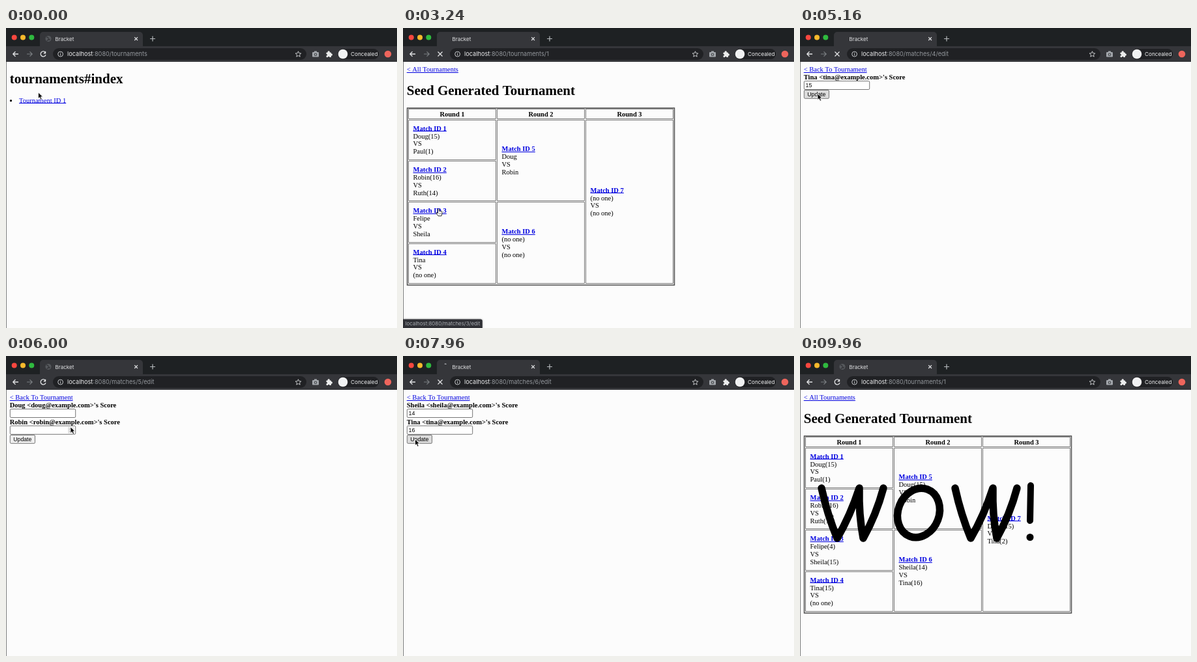
Write an HTML page with a canvas that moves like this. It is 600x461 px and loops after 10 s.

```html
<!DOCTYPE html>
<html lang="en">
<head>
<meta charset="utf-8">
<title>Bracket</title>
<style>
html, body { margin: 0; width: 100%; height: 100%; overflow: hidden; background: #fcfcfc; }
canvas { display: block; width: 600px; height: 461px; }
</style>
</head>
<body>
<canvas id="stage" width="600" height="461"></canvas>
<script>
const ctx = document.getElementById('stage').getContext('2d');
const LOOP = 10000, STEP = 40, TAU = Math.PI * 2;
const SERIF = '"Liberation Serif", serif';
const UI = 'Inter, sans-serif';
const FORM = '"Liberation Sans", sans-serif';
const LINK = '#0000e0';

// A numeric player is the winner of that match.
const matches = [
  { players: ['Doug', 'Paul'], scores: [15, 1], winner: 0, x: 15.5, y: 157.5 },
  { players: ['Robin', 'Ruth'], scores: [16, 14], winner: 0, x: 15.5, y: 221 },
  { players: ['Felipe', 'Sheila'], scores: [4, 15], winner: 1, x: 15.5, y: 284.3 },
  { players: ['Tina', null], scores: [15, null], winner: 0, x: 15.5, y: 347.5 },
  { players: [1, 2], scores: [15, null], winner: 0, x: 151.5, y: 189 },
  { players: [3, 4], scores: [14, 16], winner: 1, x: 151.5, y: 316 },
  { players: [5, 6], scores: [15, 2], winner: 0, x: 287.5, y: 252.5 }
];

// One visit to a match form: link click, page open, typing, submit, back to the table.
const runs = [
  { id: 1, click: 600, open: 680, keys: [840, 1020], submit: 1240, close: 1400, press: [32.5, 127.5] },
  { id: 2, click: 1760, open: 1840, keys: [2060, 2340], submit: 2560, close: 2700, press: [30, 128] },
  { id: 3, click: 3230, open: 3320, keys: [3520, 4160], retry: 3860, submit: 4360, close: 4520, press: [37, 139] },
  { id: 4, click: 4760, open: 4860, keys: [5020], submit: 5160, close: 5290, press: [27, 101] },
  { id: 5, click: 5620, open: 5740, keys: [6160], submit: 6400, close: 6520, press: [26, 128] },
  { id: 6, click: 6860, open: 6980, keys: [7260, 7600], submit: 7920, close: 8060, press: [18.5, 128] },
  { id: 7, click: 8400, open: 8500, keys: [8680, 8860], submit: 9040, close: 9160, press: [28, 128] }
];
const TABLE_OPEN = 400, INDEX_CLICK = 260, WOW_AT = 9440;

const within = (t, a, b) => t >= a && t < b;
const path = buildCursorPath();

function buildCursorPath() {
  const points = [[0, 49.5, 99], [180, 54, 111], [320, 54, 111], [6000, 99, 109], [9440, 46, 240]];
  for (const r of runs) {
    const m = matches[r.id - 1];
    const lx = m.x + 39, ly = m.y - 3;
    points.push([r.click - 60, lx, ly], [r.click + 50, lx, ly]);
    r.keys.forEach((k, i) => points.push([k - 90, 70 - i * 10, 88 + i * 26 + (r.retry && i ? 12 : 0)]));
    if (r.retry) points.push([r.retry - 100, 33, 127], [r.retry + 60, 33, 127]);
    points.push([r.submit - 40, ...r.press], [r.close + 100, ...r.press]);
  }
  return points.sort((a, b) => a[0] - b[0]);
}

function cursorAt(t) {
  const i = path.findIndex(p => p[0] > t);
  if (i < 0) return path[path.length - 1].slice(1);
  const [t0, x0, y0] = path[i - 1], [t1, x1, y1] = path[i];
  const u = (t - t0) / (t1 - t0), e = u * u * (3 - 2 * u);
  return [x0 + (x1 - x0) * e, y0 + (y1 - y0) * e];
}

function rect(x, y, w, h, color) {
  ctx.fillStyle = color;
  ctx.fillRect(x, y, w, h);
}

function pill(x, y, w, h, radii, fill, stroke, width = 1) {
  ctx.beginPath();
  ctx.roundRect(x, y, w, h, radii);
  if (fill) { ctx.fillStyle = fill; ctx.fill(); }
  if (stroke) { ctx.strokeStyle = stroke; ctx.lineWidth = width; ctx.stroke(); }
}

function disc(x, y, r, color) {
  ctx.beginPath();
  ctx.arc(x, y, r, 0, TAU);
  ctx.fillStyle = color;
  ctx.fill();
}

function line(d, color, width, fill) {
  const p = new Path2D(d);
  if (fill) { ctx.fillStyle = fill; ctx.fill(p); }
  ctx.strokeStyle = color;
  ctx.lineWidth = width;
  ctx.stroke(p);
}

function text(s, x, y, font, color = '#000', align = 'left') {
  ctx.font = font;
  ctx.fillStyle = color;
  ctx.textAlign = align;
  ctx.fillText(s, x, y);
  return ctx.measureText(s).width;
}

const body = (s, x, y, bold, align) =>
  text(s, x, y, `${bold ? 'bold ' : ''}10.5px ${SERIF}`, '#000', align);
const heading = (s, y) => text(s, 5.7, y, `bold 21px ${SERIF}`);

function link(s, x, y, bold) {
  const w = text(s, x, y, `${bold ? 'bold ' : ''}10.5px ${SERIF}`, LINK);
  rect(x, Math.round(y + 0.6), w, 1, LINK);
}

function playerName(slot, done) {
  if (typeof slot !== 'number') return slot;
  const m = matches[slot - 1];
  return done >= slot ? playerName(m.players[m.winner], done) : null;
}

function drawIndex() {
  heading('tournaments#index', 85);
  disc(7.5, 111.7, 1.6, '#000');
  link('Tournament ID 1', 20, 114.5);
}

function drawTable(done) {
  link('< All Tournaments', 5.7, 67);
  heading('Seed Generated Tournament', 103);
  const box = (x, y, w, h) => pill(x + 0.5, y + 0.5, w - 1, h - 1, 0, null, '#777');
  pill(6.5, 123, 410, 272, 0, null, '#4c4c4c', 1.5);
  for (let c = 0; c < 3; c++) {
    const x = 8 + c * 136, count = 4 >> c, span = 253 / count;
    const rowTop = r => Math.round(140.9 + r * span);
    box(x, 124, 135, 16);
    body('Round ' + (c + 1), x + 67.5, 135.5, true, 'center');
    for (let r = 0; r < count; r++) box(x, rowTop(r), 135, rowTop(r + 1) - rowTop(r) - 1);
  }
  matches.forEach((m, i) => {
    const label = side => {
      const name = playerName(m.players[side], done);
      const score = m.scores[side];
      return name ? name + (done > i && score !== null ? `(${score})` : '') : '(no one)';
    };
    link('Match ID ' + (i + 1), m.x, m.y, true);
    [label(0), 'VS', label(1)].forEach((s, k) => body(s, m.x, m.y + 12 + k * 11.9));
  });
}

function drawField(y, value, focused, spinner) {
  pill(6.3, y + 0.5, 100.4, 13, 1.5, '#fff', focused ? '#101010' : '#767676', focused ? 1.6 : 1);
  const w = text(value, 8.5, y + 10.2, `8.8px ${FORM}`);
  if (focused) rect(9 + w, y + 2.5, 0.8, 9, '#000');
  if (spinner) {
    rect(95, y + 2, 9.5, 10, '#e4e4e4');
    line(`M97.5 ${y + 6}l2 -2l2 2M97.5 ${y + 8.5}l2 2l2 -2`, '#777', 1);
  }
}

function drawForm(run, t, cursor) {
  const m = matches[run.id - 1];
  const failed = run.retry && t >= run.retry;
  const names = m.players.map(p => playerName(p, run.id - 1)).filter(Boolean);
  let y = 79;
  link('< Back To Tournament', 5.7, 67);
  if (failed) {
    body(`Please enter a score for ${names[1]}.`, 5.7, y, true);
    y += 12;
  }
  names.forEach((name, i) => {
    const key = run.keys[i], score = m.scores[i];
    const full = score === null ? '' : String(score);
    const typed = key === undefined ? 0 : Math.max(0, Math.floor((t - key) / 80) + 1);
    const next = run.keys[i + 1] ?? run.submit;
    const focused = key !== undefined && within(t, key - 80, Math.min(next - 90, run.submit - 80)) &&
      !(run.retry && i === 0 && t > run.retry - 80);
    const hover = cursor[0] < 107 && within(cursor[1], y + 2, y + 16);
    body(`${name} <${name.toLowerCase()}@example.com>'s Score`, 5.7, y, true);
    drawField(y + 2, full.slice(0, typed), focused, hover);
    y += 25.8;
  });
  const top = Math.round(y - 10);
  const pressed = within(t, run.submit - 60, run.close) ||
    run.retry && within(t, run.retry - 120, run.retry + 60);
  pill(6.3, top + 0.5, 38.2, 12.8, 1.5, pressed ? '#dcdcdc' : '#efefef', '#767676');
  text('Update', 25.3, top + 10, `8.7px ${FORM}`, '#000', 'center');
}

function drawChrome(url, loadingFor) {
  rect(0, 0, 600, 28, '#1e2123');
  rect(0, 28, 600, 24, '#35363a');
  ['#f8473f', '#f8b92c', '#2fba3f'].forEach((c, i) => disc(12.7 + i * 13.3, 14.5, 4, c));
  pill(52, 6, 158, 24, [5, 5, 0, 0], '#35363a');
  line('M197.2 14.2l4.8 4.8M202 14.2l-4.8 4.8', '#e4e5e7', 1.2);
  line('M225 12.5v8M221 16.5h8', '#b6b9bd', 1.2);
  text('Bracket', 75.5, 19.5, `8px ${UI}`, '#e4e5e7');

  if (loadingFor < 0) {
    disc(65, 16.5, 4.5, '#55585c');
    line('M62 14q3 0 3 2t3 1M63 20q1 -3 4 -1', '#35363a', 1.3);
  } else if (loadingFor > 20) {
    const a = -2.3 + loadingFor / 90;
    ctx.beginPath();
    ctx.arc(65, 16.5, 4.3, a, a + Math.min(1.6, loadingFor / 60));
    ctx.strokeStyle = '#b8bbbf';
    ctx.lineWidth = 1.2;
    ctx.stroke();
  }

  line('M19 40h-8M14.5 36.3l-3.7 3.7l3.7 3.7', '#e2e3e5', 1.3);
  line('M32 40h8M36.5 36.3l3.7 3.7l-3.7 3.7', '#7b7e82', 1.2);
  if (loadingFor < 0) {
    line('M60.4 37.5A4 4 0 1 0 61 41.2', '#e2e3e5', 1.3);
    line('M61 35.8v3.4h-3.4z', '#e2e3e5', 0.4, '#e2e3e5');
  } else {
    line('M53.5 36.5l7 7M60.5 36.5l-7 7', '#e2e3e5', 1.3);
  }

  pill(72, 31, 389, 18, 9, '#202124');
  pill(79.7, 36.2, 7.8, 7.8, 3.9, null, '#c7c9cc');
  rect(83.1, 39.5, 1, 2.8, '#c7c9cc');
  rect(83.1, 37.8, 1, 1, '#c7c9cc');
  const w = text('localhost', 94, 43.2, `9.2px ${UI}`, '#eeeff0');
  text(':8080' + url, 94 + w, 43.2, `9.2px ${UI}`, '#94989d');

  let star = '';
  for (let i = 0; i < 10; i++) {
    const a = i * TAU / 10 - TAU / 4, r = i % 2 ? 2.1 : 4.6;
    star += `${i ? 'L' : 'M'}${448.5 + r * Math.cos(a)} ${40.4 + r * Math.sin(a)}`;
  }
  line(star + 'z', '#d5d7da', 0.9);
  pill(470, 37, 10, 7.5, 1.3, '#a3a7ac');
  rect(473, 35.5, 4, 2, '#a3a7ac');
  disc(475, 40.7, 2.3, '#45484c');
  disc(475, 40.7, 1.2, '#a3a7ac');
  pill(491.5, 37.5, 7.5, 7.5, 1, '#eceded');
  disc(495.2, 37, 1.7, '#eceded');
  disc(499.3, 41, 1.7, '#eceded');
  disc(491.6, 41.3, 1.3, '#35363a');
  disc(495.2, 45, 1.3, '#35363a');
  pill(509, 32, 63, 16, 8, '#202124');
  disc(517, 40, 7.3, '#f1f2f3');
  text('Concealed', 529, 43.1, `8.2px ${UI}`, '#eeeff0');
  disc(586, 40, 5.3, '#ee655c');
}

function drawStatus(s, minWidth) {
  ctx.font = `7.9px ${UI}`;
  const w = Math.max(minWidth, ctx.measureText(s).width + 7);
  ctx.save();
  ctx.shadowColor = 'rgba(0,0,0,.4)';
  ctx.shadowBlur = 3;
  pill(0, 447.5, w, 14, [0, 3, 0, 0], '#303136');
  ctx.restore();
  text(s, 3.5, 457.3, `7.9px ${UI}`, '#a9adb2');
}

function drawCursor([x, y], hand) {
  ctx.save();
  ctx.translate(x, y);
  ctx.lineJoin = 'round';
  if (hand) {
    line('M-1 -3q1 -1.4 2 0v3q3 -.5 4.5 1v3l-1 3.5h-5l-3 -4q-.8 -1.4 1 -1l1.5 1z', '#111', 0.9, '#fff');
    line('M1.5 3v2M3.5 3v2', '#111', 0.6);
  } else {
    line('M0 0v9.5l2.2 -2l1.6 3.7l1.8 -.8l-1.6 -3.6h3z', '#fff', 0.8, '#000');
  }
  ctx.restore();
}

function drawWow() {
  const w = 'M33 203Q42 244 57 280Q77 246 91 203Q90 244 97 280Q117 244 128 203';
  ctx.save();
  ctx.lineCap = ctx.lineJoin = 'round';
  line(w, '#000', 11.5);
  ctx.beginPath();
  ctx.ellipse(182, 241, 31.5, 38.5, 0.36, 0, TAU);
  ctx.stroke();
  ctx.translate(205, 0);
  line(w, '#000', 11.5);
  line('M149 199L148 253', '#000', 10);
  disc(148, 278.5, 5.5, '#000');
  ctx.restore();
}

function draw(t) {
  const run = runs.find(r => within(t, r.open, r.close));
  const done = runs.filter(r => t >= r.close).length;
  const onIndex = t < TABLE_OPEN;
  const cursor = cursorAt(t);

  let loadingFor = -1;
  const load = (a, b) => { if (within(t, a, b)) loadingFor = t - a; };
  load(INDEX_CLICK, TABLE_OPEN);
  for (const r of runs) {
    load(r.click, r.open);
    load(r.submit, r.close);
    if (r.retry) load(r.retry - 70, r.retry);
  }

  rect(0, 0, 600, 461, '#fcfcfc');
  let url = '/tournaments';
  if (onIndex) {
    drawIndex();
  } else if (run) {
    url = `/matches/${run.id}/${run.retry && t >= run.retry ? 'results' : 'edit'}`;
    drawForm(run, t, cursor);
  } else {
    url += '/1';
    drawTable(done);
  }
  rect(0, 52, 0.8, 409, '#5d5e60');
  drawChrome(url, loadingFor);

  const hovered = runs.find(r => within(t, r.click - 90, r.open));
  const waiting = runs.find(r => r.id < 6 && within(t, r.submit + 30, r.close + 130));
  const onIndexLink = within(t, 150, TABLE_OPEN);
  if (waiting) drawStatus('Waiting for localhost...', 200);
  else if (hovered && hovered.id < 7) drawStatus(`localhost:8080/matches/${hovered.id}/edit`, 0);
  else if (onIndexLink) drawStatus('localhost:8080/tournaments/1', 0);

  drawCursor(cursor, hovered || onIndexLink);
  if (t >= WOW_AT) drawWow();
}

function frame() {
  const t = performance.now() % LOOP;
  draw(t - t % STEP);
  requestAnimationFrame(frame);
}
frame();
</script>
</body>
</html>
```
